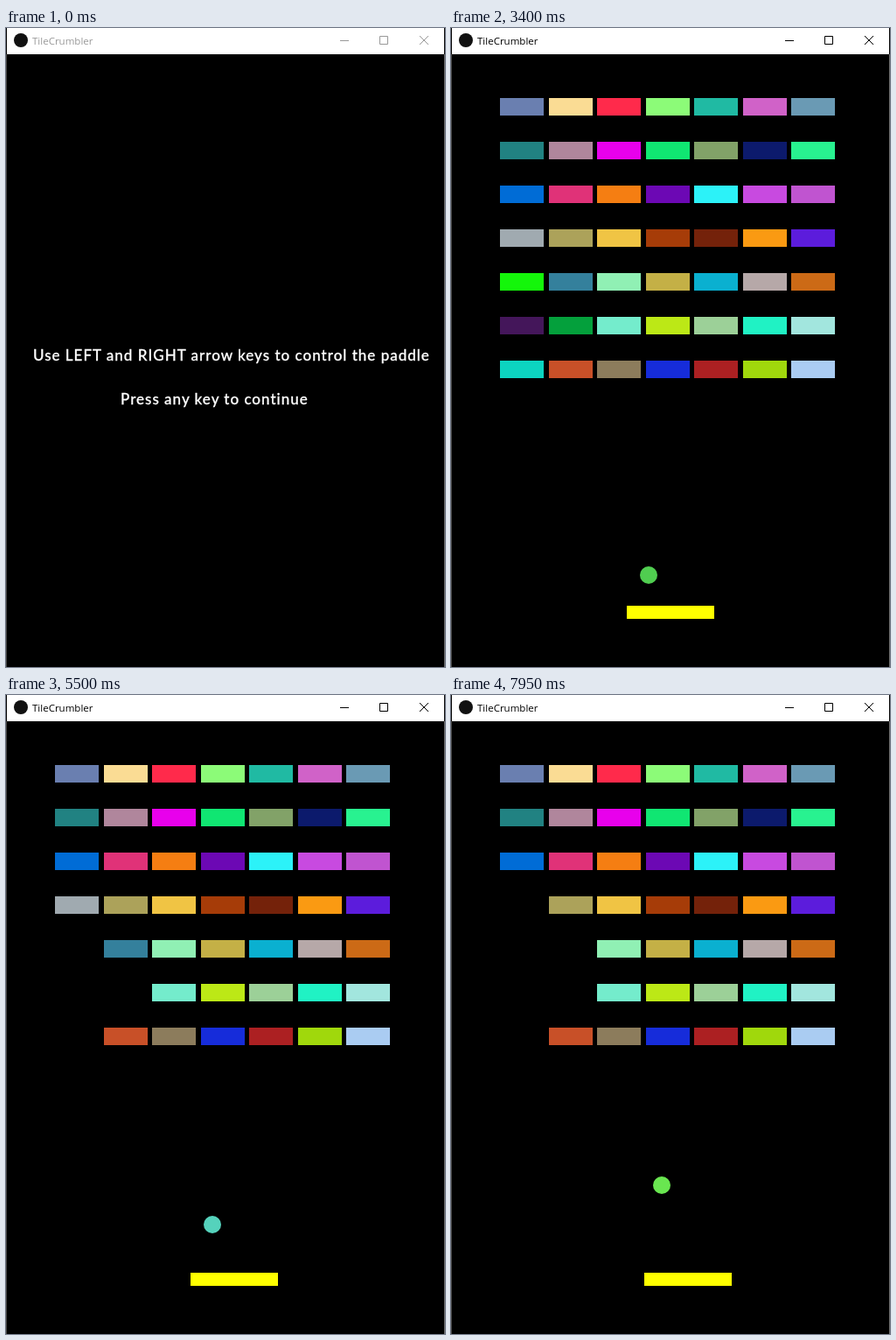
An HTML page for the animation above (8000 ms loop, 502 by 730 pixels).

```html
<!DOCTYPE html>
<html lang="en">
<head>
<meta charset="utf-8">
<title>TileCrumbler</title>
<style>
  html, body { margin: 0; width: 100%; height: 100%; overflow: hidden; background: #000; }
  svg { display: block; width: 502px; height: 730px; }
  .title { font: 11.5px "Open Sans", "Noto Sans", sans-serif; }
  .help { font: 500 17px Lato, "Open Sans", sans-serif; letter-spacing: 1px; fill: #fff; stroke: #fff; stroke-width: .3px; }
  .sharp { shape-rendering: crispEdges; }
</style>
</head>
<body>
<svg viewBox="0 0 502 730">
  <rect width="502" height="730"/>
  <g class="sharp">
    <rect y="30" width="1" height="700" fill="#484848"/>
    <rect x="501" y="30" width="1" height="700" fill="#707070"/>
    <rect x="1" width="500" height="30" fill="#fff"/>
  </g>
  <circle cx="17" cy="14" r="8" fill="#111"/>
  <text id="title" class="title" x="30" y="19">TileCrumbler</text>
  <g id="buttons" fill="none">
    <path d="M382 14.5h10M427.5 9.500h9v9h-9z"/>
    <path d="M473 9l10 10M483 9l-10 10"/>
  </g>
  <g id="intro" class="help">
    <text x="31" y="380">Use LEFT and RIGHT arrow keys to control the paddle</text>
    <text x="131" y="430">Press any key to continue</text>
  </g>
  <g id="game" transform="translate(1 30)">
    <g id="bricks" class="sharp"></g>
    <rect id="paddle" class="sharp" y="630" width="100" height="15" fill="#ff0"/>
    <circle id="ball" r="10"/>
  </g>
</svg>
<script>
const LOOP = 8000, TICK = 50, FOCUS = 1200, START = 2600;
const STEPS_PER_TICK = 3, SPEED = 5, R = 10;
const BRICK_W = 50, BRICK_H = 20, PADDLE_Y = 630;

const $ = id => document.getElementById(id);

const brickColors = `
  6a7fb0 fadc94 ff2a4b 8cfb78 20baa3 d062c8 6a9ab4
  218282 b0869c e800ec 10e672 82a268 0c1a6c 28f290
  006cd6 e03278 f57e12 6c08b4 2cf2f8 c84ae0 c054d0
  a0aab0 aca25a f0c444 a63c08 74220a fa9a12 5c1cdc
  14f60a 34809c 90f0b4 c4b046 0ab0d0 b6a8a8 cc6a16
  44165a 04a03c 74eccc bce816 9cd098 20f2c4 a2e6de
  0cd4c0 c85028 8c7c5c 162cda ac2022 a0d80c aaccf2`.trim().split(/\s+/);
const ballColors = ["#50cd50", "#a0789b", "#55d2bc", "#8cb45a", "#69e650"];

// Paddle key poses: time, left edge
const paddlePath = [
  [2600, 200], [3650, 200], [4200, 120], [4350, 100], [5100, 100], [5500, 210],
  [5650, 240], [5850, 280], [6600, 280], [7200, 160], [7700, 160], [7950, 220]
];

function paddleAt(t) {
  const i = paddlePath.findIndex(p => p[0] >= t);
  if (i < 0) return paddlePath.at(-1)[1];
  if (i === 0) return paddlePath[0][1];
  const [t0, x0] = paddlePath[i - 1], [t1, x1] = paddlePath[i];
  return Math.round((x0 + (x1 - x0) * (t - t0) / (t1 - t0)) / 10) * 10;
}

const bricks = brickColors.map((color, i) => {
  const x = 55 + (i % 7) * 55.5, y = 50 + Math.floor(i / 7) * 50;
  const el = document.createElementNS("http://www.w3.org/2000/svg", "rect");
  const attrs = { x: Math.round(x), y, width: BRICK_W, height: BRICK_H, fill: "#" + color };
  for (const k in attrs) el.setAttribute(k, attrs[k]);
  $("bricks").append(el);
  return { x, y, el, gone: Infinity };
});

const within = (v, a, size) => v >= a && v <= a + size;
const reaches = (v, a, size) => v + R >= a && v - R <= a + size;

// Play the whole game once and keep the ball's track
function simulate() {
  const track = [];
  const total = (LOOP - START) / TICK * STEPS_PER_TICK;
  let x = 250, y = 405, vx = 0, vy = SPEED, color = 0;
  for (let step = 0; step <= total; step++) {
    if (step) { x += vx; y += vy; }
    if (x <= R && vx < 0) { vx = SPEED; color++; }
    for (const b of bricks) {
      if (b.gone <= step) continue;
      if (within(x, b.x, BRICK_W) && reaches(y, b.y, BRICK_H)) vy = -vy;
      else if (within(y, b.y, BRICK_H) && reaches(x, b.x, BRICK_W)) vx = -vx;
      else continue;
      b.gone = step;
      break;
    }
    if (vy > 0 && y + R >= PADDLE_Y) {
      const center = paddleAt(START + step * TICK / STEPS_PER_TICK) + 50;
      vy = -SPEED;
      vx = x <= center ? -SPEED : SPEED;
    }
    track.push({ x, y, color });
  }
  return track;
}

const track = simulate();

function draw(time) {
  const t = Math.floor(time % LOOP / TICK) * TICK;
  const active = t >= FOCUS, playing = t >= START;
  $("title").setAttribute("fill", active ? "#000" : "#999");
  $("buttons").setAttribute("stroke", active ? "#000" : "#999");
  $("intro").style.display = playing ? "none" : "";
  $("game").style.display = playing ? "" : "none";
  if (!playing) return;

  const step = (t - START) / TICK * STEPS_PER_TICK;
  const { x, y, color } = track[step];
  $("ball").setAttribute("cx", x);
  $("ball").setAttribute("cy", y);
  $("ball").setAttribute("fill", ballColors[color % ballColors.length]);
  $("paddle").setAttribute("x", paddleAt(t));
  for (const b of bricks) b.el.style.display = b.gone <= step ? "none" : "";
}

const begin = performance.now();
function frame() {
  draw(performance.now() - begin);
  requestAnimationFrame(frame);
}
frame();
</script>
</body>
</html>
```
